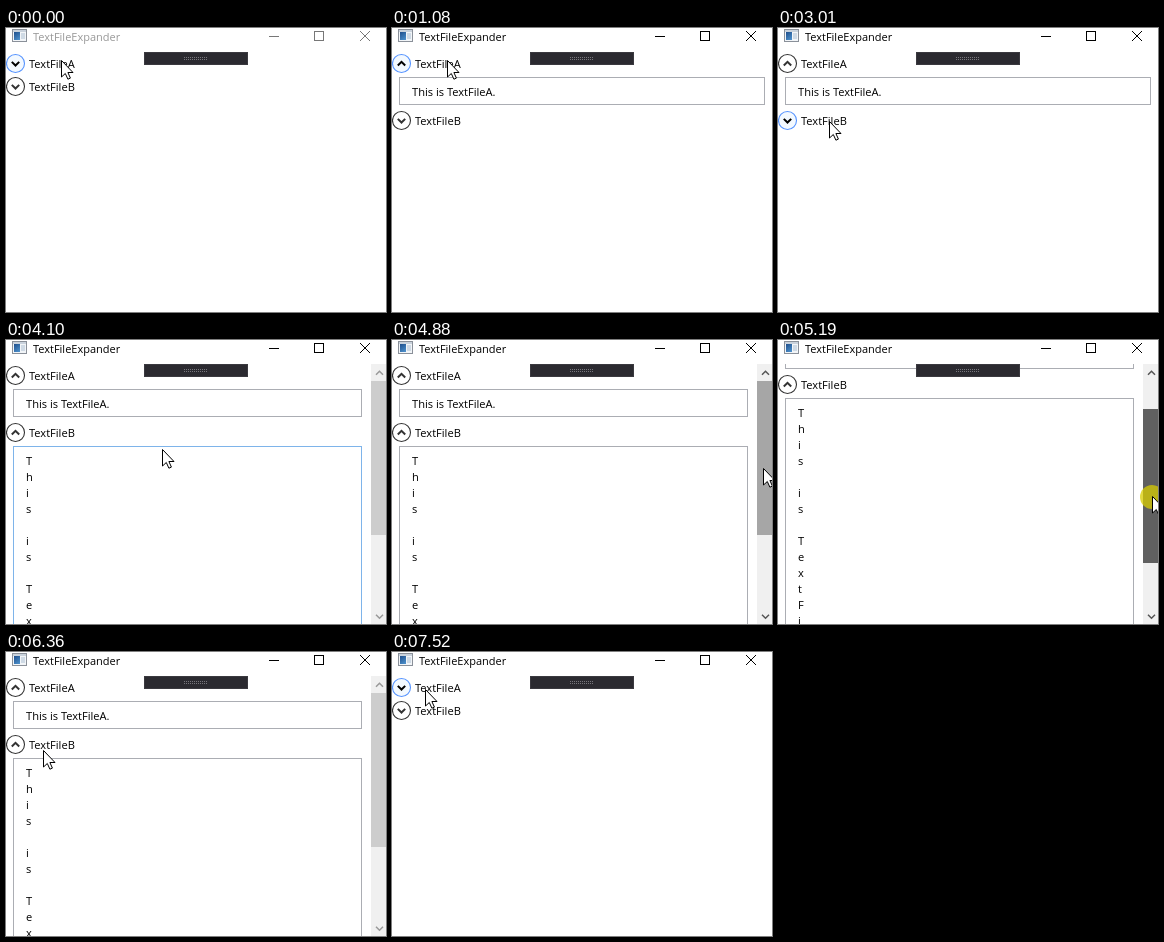
An HTML page with a canvas for the animation above (7.67 s loop, 380 by 284 pixels).

```html
<!DOCTYPE html>
<html lang="en">
<head>
<meta charset="utf-8">
<title>TextFileExpander</title>
<style>
html, body { margin: 0; width: 100%; height: 100%; overflow: hidden; background: #fff; }
canvas { display: block; }
</style>
</head>
<body>
<canvas id="stage" width="380" height="284"></canvas>
<script>
const ctx = document.getElementById('stage').getContext('2d');
const W = 380, H = 284, LOOP = 7670, STEP = 76;
const TOP = 24, LINE = 16, TRACK_TOP = 41, TRACK = 226, EXTENT = 382;
const FONT = '"Open Sans", "Noto Sans", sans-serif';

// Each leg: start time, number of steps, then target x, y and scroll offset
const START = [55, 33, 0];
const LEGS = [
  [2320, 6, 50, 104, 0],
  [2940, 2, 51, 94, 0],
  [3950, 3, 156, 110, 0],
  [4175, 4, 368, 128.6, 0],
  [4880, 2, 374, 128.6, 0],
  [5120, 2, 374, 157, 48],
  [5270, 4, 374, 200.8, 122],
  [5670, 5, 374, 128.6, 0],
  [6050, 5, 37, 99, 0],
  [6430, 1, 33, 94, 0],
  [6660, 4, 33, 38, 0]
];
const CLICKS = [[930, 1080], [3330, 3490], [6510, 6660], [7370, 7520]];
const DRAG = [5120, 6050];

const within = (v, [a, b]) => v >= a && v < b;

function pointerAt(t) {
  let pos = START;
  for (const [t0, steps, ...to] of LEGS) {
    if (t < t0) break;
    const p = Math.min(steps, Math.floor((t - t0) / STEP + 1.1)) / steps;
    pos = pos.map((v, i) => v + (to[i] - v) * p);
  }
  return pos;
}

function rect(x, y, w, h, color) {
  ctx.fillStyle = color;
  ctx.fillRect(x, y, w, h);
}

function frame(x, y, w, h, color) {
  ctx.strokeStyle = color;
  ctx.lineWidth = 1;
  ctx.strokeRect(x + 0.5, y + 0.5, w - 1, h - 1);
}

function path(points, color, width) {
  ctx.beginPath();
  points.forEach(([x, y]) => ctx.lineTo(x, y));
  ctx.strokeStyle = color;
  ctx.lineWidth = width;
  ctx.stroke();
}

function text(str, x, y, color = '#000', size = 11.1) {
  ctx.font = size + 'px ' + FONT;
  ctx.fillStyle = color;
  ctx.fillText(str, x, y);
}

function chevron(x, y, r, up, color, width) {
  const d = up ? -r / 2 : r / 2;
  path([[x - r, y - d], [x, y + d], [x + r, y - d]], color, width);
}

function titleBar(active) {
  rect(6, 1, 15, 13, '#8a9099');
  rect(7, 2, 13, 11, '#f2f5f8');
  rect(7, 2, 13, 2, '#c9d2dc');
  const blue = ctx.createLinearGradient(8, 4, 14, 12);
  blue.addColorStop(0, '#1f4f8c');
  blue.addColorStop(1, '#4f94cf');
  rect(8, 4, 6, 8, blue);
  rect(15, 5, 4, 6, '#cfdae5');

  text('TextFileExpander', 27, 13, active ? '#000' : '#999', 11);
  const ink = active ? '#000' : '#777';
  rect(263, 8, 10, 1, ink);
  frame(308, 3, 10, 10, ink);
  path([[354, 3], [364, 13]], ink, 1);
  path([[364, 3], [354, 13]], ink, 1);
}

function debugBar() {
  rect(138, 24, 104, 13, '#2b2a30');
  frame(138, 24, 104, 13, '#3a393f');
  for (let x = 178; x < 202; x += 2) {
    rect(x, 29, 1, 1, '#77767c');
    rect(x, 31, 1, 1, '#77767c');
  }
}

function header(label, y, open, hover, pressed) {
  ctx.beginPath();
  ctx.arc(9.5, y + 9.5, 9, 0, Math.PI * 2);
  ctx.fillStyle = pressed ? '#d9ecff' : hover ? '#f3f9ff' : '#fff';
  ctx.fill();
  ctx.strokeStyle = pressed ? '#3c77dd' : hover ? '#5593ff' : '#333';
  ctx.lineWidth = 1.1;
  ctx.stroke();
  chevron(9.5, y + 9.7, 3.7, open, hover ? '#000' : '#333', 2);
  text(label, 23, y + 14);
}

function textBox(y, width, lines, hover) {
  frame(7, y, width, lines.length * LINE + 12, hover ? '#7eb4ea' : '#abadb3');
  lines.forEach((line, i) => text(line, 20, y + 19 + i * LINE));
}

function scrollBar(scroll, hover, drag) {
  rect(365, TOP, 15, H - TOP, '#f0f0f0');
  const thumb = drag ? '#606060' : hover ? '#a6a6a6' : '#cdcdcd';
  const k = TRACK / EXTENT;
  rect(365, Math.round(TRACK_TOP + scroll * k), 15, Math.round((H - TOP) * k), thumb);
  const ink = hover ? '#555' : '#999';
  chevron(373.5, 33, 3.5, true, ink, 1.5);
  chevron(373.5, 276.5, 3.5, false, ink, 1.5);
}

function highlight(x, y) {
  ctx.beginPath();
  ctx.arc(x, y, 12, 0, Math.PI * 2);
  ctx.fillStyle = 'rgba(216, 204, 0, 0.75)';
  ctx.fill();
}

function cursor(x, y) {
  ctx.save();
  ctx.translate(Math.round(x) + 0.5, Math.round(y) - 0.5);
  ctx.beginPath();
  [[0, 0], [0, 16.5], [3.8, 13], [6.4, 18.7], [8.9, 17.6], [6.4, 12], [11.5, 12]]
    .forEach(([px, py]) => ctx.lineTo(px, py));
  ctx.closePath();
  ctx.fillStyle = '#fff';
  ctx.fill();
  ctx.strokeStyle = '#000';
  ctx.lineWidth = 1;
  ctx.stroke();
  ctx.restore();
}

function draw(t) {
  const [x, y, offset] = pointerAt(t);
  const scroll = Math.round(offset);
  const openA = within(t, [1005, 7445]);
  const openB = within(t, [3410, 6585]);
  const drag = within(t, DRAG);
  const click = CLICKS.find(c => within(t, c));
  const down = click && t < click[0] + 75;

  const boxWidth = openB ? 349 : 366;
  const topA = 26 - scroll;
  const topB = topA + (openA ? 57 : 23);
  const over = (top, h) => x < 360 && y >= top && y < top + h;
  const overA = over(topA, 15), overB = over(topB, 15);

  rect(0, 0, W, H, '#fff');
  ctx.save();
  ctx.beginPath();
  ctx.rect(0, TOP, W, H - TOP);
  ctx.clip();
  header('TextFileA', topA, openA, overA, overA && down);
  if (openA) textBox(topA + 23, boxWidth, ['This is TextFileA.'], over(topA + 23, 28));
  header('TextFileB', topB, openB, overB, overB && down);
  if (openB) {
    textBox(topB + 23, boxWidth, [...'This is TextFileB.'], over(topB + 23, 300));
    scrollBar(scroll, x >= 370, drag);
  }
  ctx.restore();

  titleBar(t >= 930);
  debugBar();
  if (click || drag) highlight(x, y);
  cursor(x, y);
}

const begin = performance.now();
function tick() {
  draw((performance.now() - begin) % LOOP);
  requestAnimationFrame(tick);
}
tick();
</script>
</body>
</html>
```
